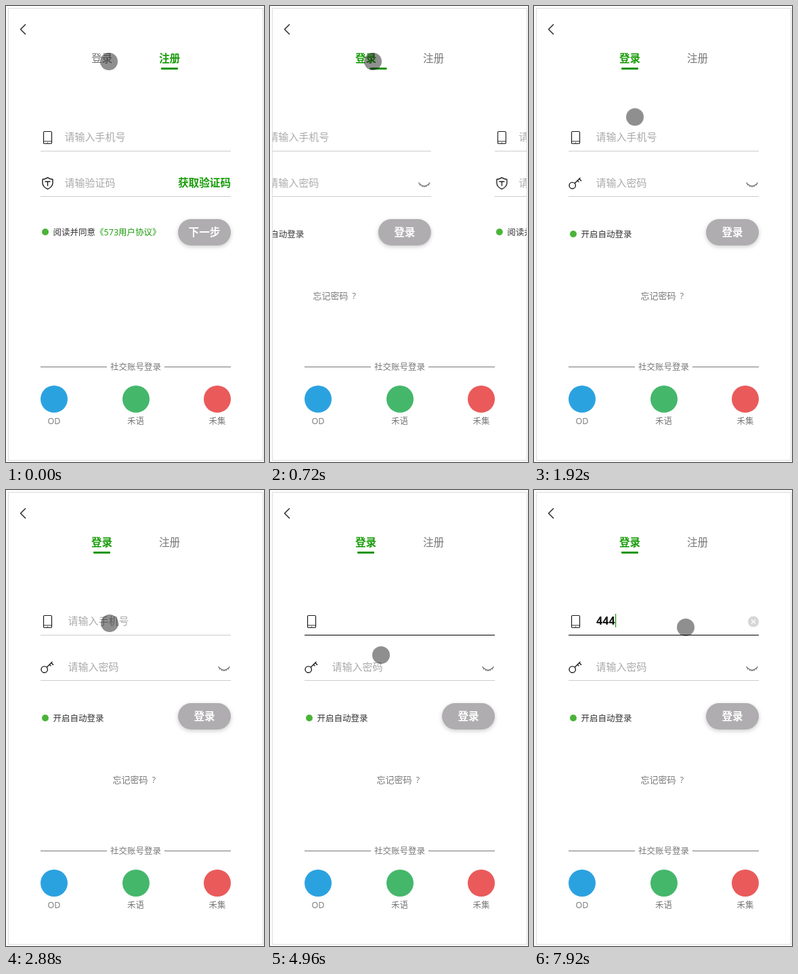
Animation of 381 by 674 pixels, one loop 8 s. Source, as an HTML page:

```html
<!DOCTYPE html>
<html lang="zh-CN">
<head>
<meta charset="utf-8">
<title>登录与注册</title>
<style>
  :root { --green: #189c08; --grey: #777; --loop: 8s; }
  html, body { margin: 0; width: 100%; height: 100%; overflow: hidden; background: #fff; }
  svg { display: block; width: 100%; height: 100%; }
  text { font-family: "Open Sans", "Noto Sans CJK SC", "Noto Sans CJK", sans-serif; font-size: 12.5px; fill: #333; }

  .tab, .strong { font-size: 15.6px; }
  .strong { font-weight: 700; }
  .tab, .mid { text-anchor: middle; }
  .hint { font-size: 15px; fill: #aaa; }
  .green { fill: var(--green); }
  .soft { fill: var(--grey); }
  .white { fill: #fff; }
  .rule { stroke: #ccc; }
  .ink { fill: none; stroke: #1c1c1c; stroke-width: 1.4; stroke-linecap: round; stroke-linejoin: round; }
  .pill { fill: #afadaf; filter: drop-shadow(0 2px 3px rgba(0, 0, 0, .2)); }
  .digit { font-size: 16px; font-weight: 700; fill: #111; }

  .register { animation: slideOut var(--loop) linear infinite; }
  .login { animation: slideIn var(--loop) linear infinite; }
  .bar { fill: #149400; animation: bar var(--loop) linear infinite; }
  .cursor { animation: cursor var(--loop) linear infinite; }
  .step { animation: var(--name) var(--loop) step-end infinite; }

  @keyframes slideOut {
    0%, .7% { transform: translateX(0); animation-timing-function: ease; }
    19.14%, 100% { transform: translateX(375px); }
  }
  @keyframes slideIn {
    0%, .7% { transform: translateX(-375px); animation-timing-function: ease; }
    19.14%, 100% { transform: translateX(0); }
  }
  @keyframes bar {
    0%, .7% { transform: translateX(100px); }
    10.9%, 100% { transform: translateX(0); }
  }
  @keyframes activate {
    0% { fill: var(--grey); font-weight: 400; }
    .8%, 100% { fill: var(--green); font-weight: 700; }
  }
  @keyframes deactivate {
    0% { fill: var(--green); font-weight: 700; }
    .8%, 100% { fill: var(--grey); font-weight: 400; }
  }
  @keyframes focusLine {
    0% { stroke: #ccc; }
    49.8%, 100% { stroke: #000; }
  }
  @keyframes hideHint {
    0% { opacity: 1; }
    49.8%, 100% { opacity: 0; }
  }
  @keyframes first {
    0% { opacity: 0; }
    88.8%, 100% { opacity: 1; }
  }
  @keyframes second {
    0% { opacity: 0; }
    92.8%, 100% { opacity: 1; }
  }
  @keyframes third {
    0% { opacity: 0; }
    96.8%, 100% { opacity: 1; }
  }
  @keyframes caret {
    0% { opacity: 0; transform: translateX(0); }
    49.8% { opacity: 1; transform: translateX(0); }
    57.8% { opacity: 0; transform: translateX(0); }
    70.8% { opacity: 1; transform: translateX(0); }
    75.8% { opacity: 0; transform: translateX(0); }
    85.8% { opacity: 1; transform: translateX(0); }
    88.8% { opacity: 1; transform: translateX(9.3px); }
    92.8% { opacity: 1; transform: translateX(18.7px); }
    96.8%, 100% { opacity: 1; transform: translateX(28px); }
  }
  @keyframes cursor {
    0%, 19% { transform: translate(152px, 82px); }
    22% { transform: translate(148px, 144px); }
    24% { transform: translate(149px, 164px); }
    32%, 36% { transform: translate(153px, 197px); }
    41%, 57% { transform: translate(154px, 196px); }
    62%, 64% { transform: translate(164px, 244px); }
    66%, 70% { transform: translate(168px, 248px); }
    72% { transform: translate(185px, 194px); animation-timing-function: step-end; }
    98.8%, 100% { transform: translate(224px, 203px); }
  }
</style>
</head>
<body>
<svg viewBox="0 0 381 674">
  <defs>
    <clipPath id="screen"><rect x="4" y="100" width="375" height="400"/></clipPath>
    <g id="phone" class="ink">
      <rect x="55.5" y="185.5" width="12" height="18" rx="1.6" stroke-width="1.2"/>
      <path d="M55.5 200H67.5" stroke-width=".9"/>
      <path d="M61.2 202H61.8" stroke-width="1.2"/>
    </g>
  </defs>

  <rect width="381" height="674" fill="#fcfcfc"/>
  <rect x="3.5" y="3.5" width="376" height="668" fill="#fff" stroke="#dcdcdc"/>

  <path class="ink" d="M28.5 27.5L21.5 34.5L28.5 41.5"/>
  <text class="tab step" style="--name: activate" x="141.5" y="83.4">登录</text>
  <text class="tab step" style="--name: deactivate" x="241.5" y="83.4">注册</text>
  <rect class="bar" x="129" y="91" width="25" height="3" rx="1"/>

  <g clip-path="url(#screen)">
    <g class="register">
      <use href="#phone"/>
      <text class="hint" x="86.6" y="199">请输入手机号</text>
      <path class="rule" d="M51 214.5H332"/>

      <path class="ink" d="M61.5 253.7Q65 256 69 256.3V262Q68.5 267.5 61.5 270.7Q54.5 267.5 54 262V256.3Q58 256 61.5 253.7Z"/>
      <path class="ink" d="M58 259.5H65M61.5 259.5V265.5"/>
      <text class="hint" x="86.6" y="267">请输验证码</text>
      <text class="strong green" x="332" y="267.3" text-anchor="end">获取验证码</text>
      <path class="rule" d="M51 281.5H332"/>

      <circle cx="58" cy="334" r="5" fill="#4bb338"/>
      <text x="69.6" y="339">阅读并同意<tspan class="green">《573用户协议》</tspan></text>
      <rect class="pill" x="254" y="315" width="78" height="39" rx="19.5"/>
      <text class="strong white mid" x="293" y="340.3">下一步</text>
    </g>

    <g class="login">
      <use href="#phone"/>
      <text class="hint step" style="--name: hideHint" x="91.6" y="199">请输入手机号</text>
      <path class="rule step" style="--name: focusLine" d="M51 214.5H332"/>
      <text class="digit step" style="--name: first" x="92" y="199.3">4</text>
      <text class="digit step" style="--name: second" x="101.3" y="199.3">4</text>
      <text class="digit step" style="--name: third" x="110.6" y="199.3">4</text>
      <rect class="step green" style="--name: caret" x="92" y="183" width="1.2" height="20"/>
      <g class="step" style="--name: first">
        <circle cx="324" cy="194.5" r="8" fill="#d6d6d6"/>
        <path d="M321 191.5L327 197.5M327 191.5L321 197.5" stroke="#fff" stroke-width="1.4"/>
      </g>

      <g class="ink">
        <circle cx="56.7" cy="265.3" r="4.7"/>
        <path d="M60.2 262L68 254.2M64.2 258L66 259.8M66.8 255.4L69.6 258.2"/>
      </g>
      <text class="hint" x="91.6" y="267">请输入密码</text>
      <path d="M313.5 261Q322 271.5 330.5 261M316 263.5L314.8 265M319.2 265.5L318.6 267.3M322 266.2V268M324.8 265.5L325.4 267.3M328 263.5L329.2 265"
            fill="none" stroke="#777" stroke-width="1.3"/>
      <path class="rule" d="M51 281.5H332"/>

      <circle cx="58" cy="337" r="5" fill="#4bb338"/>
      <text x="69.6" y="342">开启自动登录</text>
      <rect class="pill" x="254" y="315" width="78" height="39" rx="19.5"/>
      <text class="strong white mid" x="293" y="340.3">登录</text>
      <text class="soft" style="font-size: 13px" x="157.6" y="433">忘记密码<tspan dx="6">?</tspan></text>
    </g>
  </g>

  <path d="M51 533.5H149M234 533.5H332" stroke="#777"/>
  <text class="soft mid" x="191.5" y="538.3">社交账号登录</text>
  <circle cx="71" cy="581" r="20" fill="#2ba2e0"/>
  <circle cx="192" cy="581" r="20" fill="#45b76b"/>
  <circle cx="312" cy="581" r="20" fill="#ea5a5a"/>
  <text class="soft mid" x="71" y="618">OD</text>
  <text class="soft mid" x="191.5" y="618">禾语</text>
  <text class="soft mid" x="312" y="618">禾集</text>

  <circle class="cursor" r="13" fill="#000" fill-opacity=".44"/>
</svg>
</body>
</html>
```
